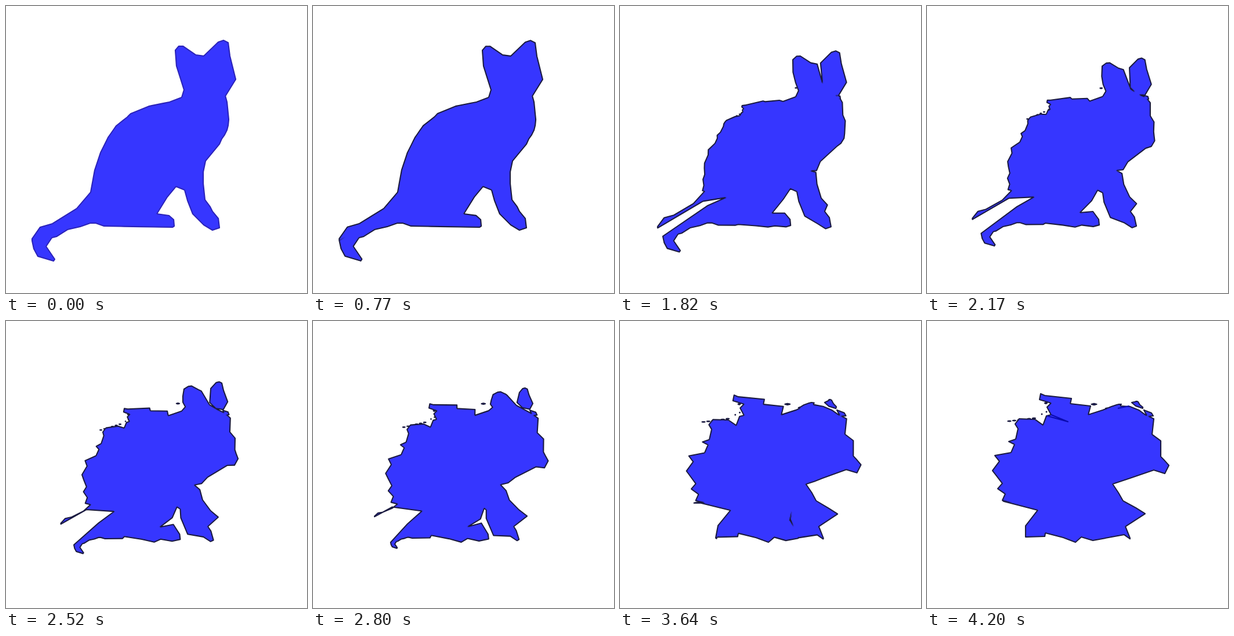
Write an HTML page with a canvas that moves like this. It is 519x493 px and loops after 4830 ms.

```html
<!DOCTYPE html>
<html lang="en">
<head>
<meta charset="utf-8">
<title>Cat to map morph</title>
<style>
html, body { margin: 0; width: 100%; height: 100%; overflow: hidden; background: #fff; }
canvas { display: block; }
</style>
</head>
<body>
<canvas id="stage" width="519" height="493"></canvas>
<script>
const ctx = document.getElementById('stage').getContext('2d');
const LOOP = 4830, STEP = 70, STEPS = 50, MAP_START = 4200;

const mix = (a, b, t) => a + (b - a) * t;
const parse = text => text.split(' ').map(p => p.split(',').map(Number));

// Share of the length reached at each corner of a polyline.
function shares(line) {
  let sum = 0;
  const sums = line.map(([x, y], i) => sum += i && Math.hypot(x - line[i - 1][0], y - line[i - 1][1]));
  return sums.map(s => sum ? s / sum : 0);
}

function pointAt(line, marks, share) {
  const i = marks.findIndex(m => m >= share);
  if (i < 1) return line.at(i);
  const t = (share - marks[i - 1]) / (marks[i] - marks[i - 1]);
  return line[i].map((v, axis) => mix(line[i - 1][axis], v, t));
}

// Pairs two polylines: corner by corner if their counts agree, else by length.
function pair(catText, mapText) {
  const cat = parse(catText), map = parse(mapText);
  if (cat.length === map.length) return cat.map((p, i) => [...p, ...map[i]]);
  const catMarks = shares(cat), mapMarks = shares(map);
  return [...new Set([...catMarks, ...mapMarks])].sort((a, b) => a - b)
    .map(s => [...pointAt(cat, catMarks, s), ...pointAt(map, mapMarks, s)]);
}

const mainland = [
  // head and back
  pair('342,86 327,84 305,69 298,69 292,76 294,103 301,125 307,144 303,157',
       '333,146 335,143 331,143 327,144 318,147 313,149 308,150 311,150 303,153'),
  pair('282,165 247,172 215,185', '278,161 282,146 247,142 249,133 203,128 196,125'),
  pair('215,185 209,191', '194,135 214,141 207,148 214,161 206,163 200,179'),
  pair('209,191 190,206 176,226 163,252',
       '200,179 186,169 159,168 152,177 157,185 153,203 141,207 151,212 145,226 117,231'),
  pair('163,252 153,282 146,320', '117,231 125,241 113,257 130,279 122,288 135,297 130,308'),
  // tail, split lengthwise
  pair('146,320 122,348 80,374 59,380 45,400', '146,312 131,309'),
  pair('45,403 146,343 181,330 146,340 45,403', '131,309 133,310 191,325 170,352 170,371'),
  pair('45,403 48,417 55,430 82,438 84,435 69,413 79,398 87,396 106,384 128,379 145,373 155,373',
       '170,371'),
  // belly and legs
  pair('169,378 287,380', '172,371 203,370 204,364 235,372 256,380 266,371 286,377'),
  pair('290,378 289,367 281,360 260,357 278,328 293,310 308,316 313,334 322,357',
       '308,373 307,366 294,342 269,352 293,345 296,326 295,328 293,341 307,373'),
  pair('341,376 356,385 368,381 366,365 356,353 352,345 343,333 340,305 340,283 331,284 340,285',
       '340,367 350,374 350,373 344,358 342,353 376,331 360,321 338,309 330,295 320,280 335,275'),
  // chest and neck
  pair('344,266 368,237 372,228 377,221 381,213 383,205 384,195 383,185 381,165 378,154',
       '350,270 391,256 410,262 417,248 408,238 403,233 403,206 388,195 391,168 376,161'),
  pair('364,151 352,140', '365,153 350,147')
].flat();

const rightEar = pair('341,86 349,140 365,156 378,155 396,126 386,86 383,63 375,59 366,62',
                      '362,138 353,140 360,146 372,150 372,148 367,144 364,139 362,138 360,138');
const eastIsle = pair('374,154 375,158 377,158 377,154', '374,153 380,164 390,163 387,158');

// A small island grows from a point hidden in the cat.
const isle = (x, y, mx, my, w, h) =>
  [[-w, 0], [0, h], [w, 0], [0, -h]].map(([dx, dy]) => [x, y, mx + dx, my + dy]);

const coastIsles = Array.from({ length: 6 }, (_, i) =>
  isle(193 + 4 * i, 208 - 3.3 * i, 142 + 8.5 * i, 172 - i, 2.5, .3));

const shapes = [mainland, rightEar, eastIsle, ...coastIsles,
  isle(308, 140, 288, 143, 4.5, 1.2), isle(217, 189, 198, 160, .4, .4),
  isle(218, 188, 206, 156, .4, .4), isle(219, 187, 205, 141, 2, 1)];

const quadInOut = t => t < .5 ? 2 * t * t : 1 - 2 * (1 - t) ** 2;

function outline(t) {
  const path = new Path2D();
  for (const points of shapes) {
    points.forEach(([x, y, mx, my], i) =>
      path[i ? 'lineTo' : 'moveTo'](mix(x, mx, t), mix(y, my, t)));
    path.closePath();
  }
  return path;
}

function innerLine(text) {
  ctx.beginPath();
  for (const [x, y] of parse(text)) ctx.lineTo(x, y);
  ctx.stroke();
}

function draw(ms) {
  const step = ms < 700 ? 0 : Math.min(STEPS, Math.floor((ms - 630) / STEP));
  const path = outline(quadInOut(step / STEPS));
  ctx.clearRect(0, 0, 519, 493);
  ctx.lineJoin = 'round';

  // Shrink the joined fill by a pixel, then put the dark border behind it.
  ctx.fillStyle = '#3636ff';
  ctx.fill(path);
  ctx.globalCompositeOperation = 'destination-in';
  for (const [dx, dy] of [[1, 0], [-1, 0], [0, 1], [0, -1]]) {
    ctx.setTransform(1, 0, 0, 1, dx, dy);
    ctx.fill(path);
  }
  ctx.resetTransform();
  ctx.globalCompositeOperation = 'destination-over';
  ctx.lineWidth = 2.2;
  ctx.fillStyle = ctx.strokeStyle = ms < STEP ? '#2a22b8' : '#1a1a40';
  ctx.fill(path);
  ctx.stroke(path);
  ctx.globalCompositeOperation = 'source-over';

  if (ms >= MAP_START) {
    ctx.lineWidth = 2;
    ctx.strokeStyle = '#0a0ab0';
    innerLine('214,161 243,173 207,163');
    innerLine('329,150 349,146');
  }
}

function tick(now) {
  draw(now % LOOP);
  requestAnimationFrame(tick);
}
draw(0);
requestAnimationFrame(tick);
</script>
</body>
</html>
```
